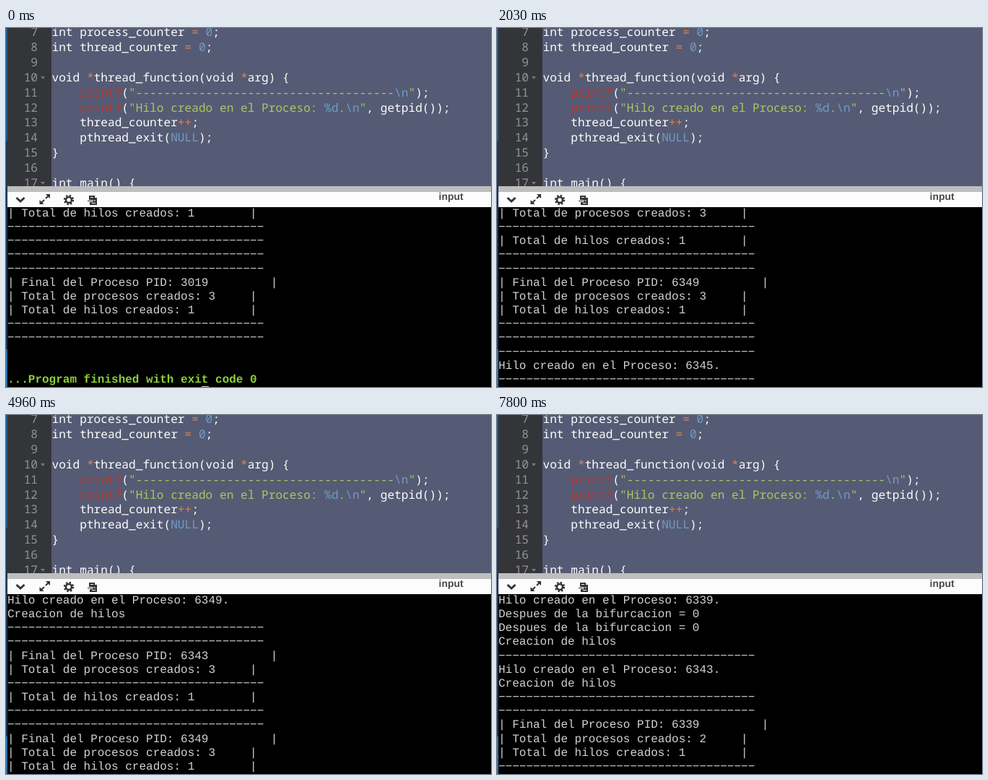
An HTML page for the animation above (8 s loop, 672x497 px).

```html
<!DOCTYPE html>
<html lang="es">
<head>
<meta charset="utf-8">
<title>Consola</title>
<style>
  html, body { margin: 0; width: 100%; height: 100%; overflow: hidden; background: #000; }
  #stage { position: relative; width: 672px; height: 497px; overflow: hidden; text-rendering: geometricPrecision; }
  #stage > *, #overlay > * { position: absolute; }
  pre { margin: 0; white-space: pre; }
  #edge { left: 0; top: 0; width: 2px; height: 497px;
    background: linear-gradient(#1d5a92 156px, #17375b 156px 445px, #2c6ca6 445px); }
  #editor { left: 2px; top: 0; width: 670px; height: 219px; background: #555b74; overflow: hidden; }
  #gutter { position: absolute; left: 0; top: 0; width: 61px; height: 219px; background: #343539; }
  #editor pre { position: absolute; top: -5px; font: 16.15px/20.9px "Noto Sans Mono", monospace; }
  #numbers { width: 42px; left: 0; text-align: right; color: #939396; }
  #editor #code { left: 61.5px; color: #fdfdfb; font-weight: 500; }
  #code i { font-style: normal; }
  .op { color: #dc8250; } .fn { color: #b23730; } .str { color: #a9c765; } .esc { color: #709bc9; }
  .fold { position: absolute; left: 46px; border: 3px solid transparent; border-top: 4px solid #77787c; }
  #splitter { left: 2px; top: 219px; width: 670px; height: 8px; background: #bebebe; }
  #toolbar { left: 2px; top: 227px; width: 670px; height: 21px; background: #fdfcfd; }
  #icons { left: 0; top: 227px; }
  #label { left: 599.5px; top: 224px; font: bold 14px/18px "Liberation Sans", sans-serif; color: #4a4a4a; }
  #console { left: 2px; top: 248px; width: 670px; height: 249px; background: #000; overflow: hidden;
    font: 16px/19.17px "Liberation Mono", monospace; color: #d2d2d2; }
  #console pre { font: inherit; height: 19.17px; }
  #console pre.done { font-weight: bold; color: #8ad038; }
  #cursor { left: 271px; top: 496px; width: 10px; height: 1px; background: #ddd; }
  #overlay { left: 2px; top: 227px; width: 670px; height: 270px; background: rgba(54, 118, 176, .5); overflow: hidden; }
  #spinner { left: 584px; top: 0; width: 61px; height: 54px; background: #fff; }
  #message { left: 55px; top: 54px; width: 615px; height: 50px; background: #fff; overflow: hidden; }
  #message span { position: absolute; left: 466.5px; white-space: pre;
    font: 20px/50px "Liberation Sans", sans-serif; color: #1c3c66; }
</style>
</head>
<body>
<div id="stage">
  <div id="edge"></div>
  <div id="editor">
    <div id="gutter"></div>
    <pre id="numbers"></pre>
    <b class="fold" style="top:67px"></b><b class="fold" style="top:213px"></b>
    <pre id="code">int process_counter <i class="op">=</i> <i class="esc">0</i>;
int thread_counter <i class="op">=</i> <i class="esc">0</i>;

void <i class="op">*</i>thread_function(void <i class="op">*</i>arg) {
    <i class="fn">printf</i>(<i class="str">"-------------------------------------<i class="esc">\n</i>"</i>);
    <i class="fn">printf</i>(<i class="str">"Hilo creado en el Proceso: <i class="esc">%d</i>.<i class="esc">\n</i>"</i>, getpid());
    thread_counter<i class="op">++</i>;
    pthread_exit(<i class="esc">NULL</i>);
}

int main() {</pre>
  </div>
  <div id="splitter"></div>
  <div id="toolbar"></div>
  <svg id="icons" width="140" height="20" fill="none" stroke="#333">
    <path d="M14.5 8 20 13l5.500-5" stroke-width="3"/>
    <path d="M49 15 53 11M55 9l4-4" stroke-width="2"/>
    <path d="M46.500 17v-6l6 6zM61 3v6l-6-6z" fill="#333" stroke="none"/>
    <circle cx="87" cy="11" r="4" stroke-width="2.600"/>
    <circle cx="87" cy="11" r="6" stroke-width="2.400" stroke-dasharray="2.356"/>
    <path d="M115 5h8v3h3v10h-10v-4h4v-3h-5z" fill="#333" stroke="none"/>
    <path d="M113 12.500h6M121 11.500h3M121 14.500h3" stroke="#333"/>
    <path d="M117 7.500h4M121 12h3M119 15.500h5" stroke="#fdfcfd"/>
  </svg>
  <div id="label">input</div>
  <div id="console"></div>
  <div id="cursor"></div>
  <div id="overlay">
    <svg id="spinner" viewBox="-30.5 -23.5 61 54"><g id="wheel"></g></svg>
    <div id="message"><span>Compiling Program...</span></div>
  </div>
</div>
<script>
const LOOP = 8000, ROWS = 13;
const COMPILE_START = 500, COMPILE_END = 1420, SPIN_STEP = 76, WEDGES = 18;
const $ = id => document.getElementById(id);

// Program output
const rule = '\u2212'.repeat(37);
const final = pid => `| Final del Proceso PID: ${pid}`.padEnd(38) + '|';
const processes = n => `| Total de procesos creados: ${n}`.padEnd(35) + '|';
const threads = '| Total de hilos creados: 1'.padEnd(35) + '|';
const created = pid => `Hilo creado en el Proceso: ${pid}.`;
const creation = 'Creacion de hilos', forked = 'Despues de la bifurcacion = 0';
const ending = pid => [final(pid), processes(3), threads, rule, rule, '', '',
  '...Program finished with exit code 0'];

const previousRun = [threads, rule, rule, rule, rule, ...ending(3019)];
const currentRun = [
  rule, 'Proceso padre. PID: 6339',
  'Proceso padre antes de la bifurcacion. PID: 6339',
  'Proceso Hijo. ChilPID: 6343, Proceso Padre PID: 6339',
  rule, created(6339), forked, forked, creation,
  rule, created(6343), creation, rule,
  rule, final(6339), processes(2), threads, rule,
  rule, created(6349), creation, rule, rule, final(6343),
  processes(3), rule, threads, rule, rule,
  final(6349), processes(3), threads, rule, rule, rule,
  created(6345), rule, rule, ...ending(6345)
];

// [time, first visible line of the current run]
const scroll = [
  [1880, 0], [1960, 12], [2030, 24], [2340, 33],
  [3110, 28], [3190, 24], [3420, 25], [3800, 27], [3880, 26], [3960, 24],
  [4960, 19], [5040, 14], [5110, 9], [5190, 4], [5260, 0],
  [6730, 1], [6960, 2], [7110, 3], [7570, 4], [7800, 5]
];

$('numbers').textContent = Array.from({ length: 11 }, (_, i) => i + 7).join('\n');
const rows = Array.from({ length: ROWS }, () => $('console').appendChild(document.createElement('pre')));

// Pointed blades that fade behind the leading one
$('wheel').innerHTML = Array.from({ length: 11 }, (_, i) =>
  `<path d="M6 0 28 -4 Q30 0 28 4Z" fill="#184d80" opacity="${1 - i / 11}" transform="rotate(${-i * 360 / WEDGES})"/>`
).join('');

function visibleLines(t) {
  if (t < COMPILE_END) return previousRun;
  const view = scroll.findLast(([time]) => time <= t);
  return view ? currentRun.slice(view[1], view[1] + ROWS) : [];
}

function render(t) {
  const compiling = t >= COMPILE_START && t < COMPILE_END;
  const lines = compiling ? [] : visibleLines(t);
  rows.forEach((row, i) => {
    const text = lines[i] || '';
    if (row.textContent !== text) row.textContent = text;
    row.className = text.startsWith('...') ? 'done' : '';
  });
  $('overlay').style.display = compiling ? '' : 'none';
  $('cursor').style.display = t < COMPILE_START || (t >= 2340 && t < 2960) ? '' : 'none';
  const step = Math.floor((t - COMPILE_START) / SPIN_STEP);
  $('wheel').setAttribute('transform', `rotate(${58 + (step - 11) * 360 / WEDGES})`);
}

function tick() {
  render(performance.now() % LOOP);
  requestAnimationFrame(tick);
}
tick();
</script>
</body>
</html>
```
